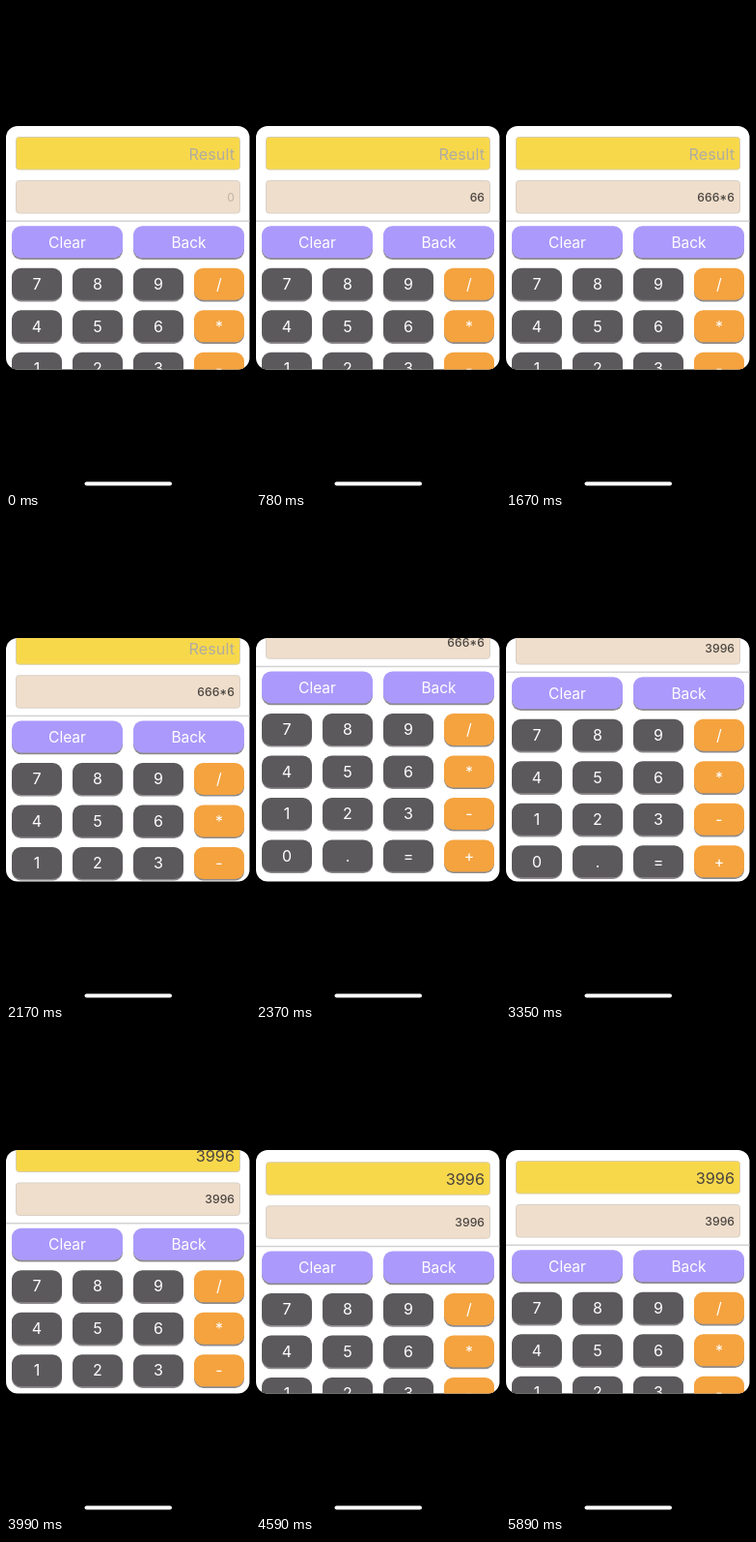
Recreate the animation shown at these times as an HTML page. Size 253x500 px, loop 5.99 s.

```html
<!DOCTYPE html>
<html lang="en">
<head>
<meta charset="utf-8">
<title>Calculator</title>
<style>
html, body { margin: 0; width: 100%; height: 100%; overflow: hidden; background: #000; }
svg { display: block; width: 100%; height: 100%; }
text { font-family: Inter, Roboto, sans-serif; }
.key { fill: #fff; font-size: 16px; text-anchor: middle; }
.wide { font-size: 15.5px; }
.value { text-anchor: end; fill: #494440; }
#result { font-size: 16.3px; }
#entry { font-size: 12.2px; font-weight: 500; }
#result.empty { fill: #b0aca0; }
#entry.empty { fill: #bfb4a8; font-weight: 400; }
</style>
</head>
<body>
<svg viewBox="0 0 253 500">
  <clipPath id="card"><rect y="124" width="252.5" height="251.5" rx="12"/></clipPath>
  <g clip-path="url(#card)">
    <rect y="124" width="253" height="252" fill="#fff"/>
    <g id="page">
      <rect x="10.5" y="135.5" width="232" height="33.5" rx="3" fill="#f8d84b" stroke="#d6cda8"/>
      <rect x="10.5" y="180.5" width="232" height="33.5" rx="3" fill="#efdecb" stroke="#d8d0c8"/>
      <text id="result" class="value" x="237" y="158.7"/>
      <text id="entry" class="value" x="237" y="201.8"/>
      <rect y="221.5" width="253" height="1.5" fill="#d2d2d4"/>
    </g>
  </g>
  <rect x="81.5" y="491.5" width="90.5" height="4" rx="2" fill="#fff"/>
</svg>
<script>
const LOOP = 5990, BOTTOM = -63;
const $ = id => document.getElementById(id);
const page = $('page'), result = $('result'), entry = $('entry');

function add(tag, attrs, label = '') {
  const el = document.createElementNS('http://www.w3.org/2000/svg', tag);
  for (const name in attrs) el.setAttribute(name, attrs[name]);
  el.textContent = label;
  page.append(el);
}

function key(label, x, y, width, fill, cls = 'key') {
  const box = { x, width, height: 33, rx: 9.5 };
  add('rect', { ...box, y: y + 1.7, fill: '#8e8b8d' });
  add('rect', { ...box, y, fill });
  add('text', { x: x + width / 2, y: y + 22.3, class: cls }, label);
}

key('Clear', 6, 227.3, 115, '#ab9afb', 'key wide');
key('Back', 132, 227.3, 115, '#ab9afb', 'key wide');
['789/', '456*', '123-', '0.=+'].forEach((row, r) =>
  [...row].forEach((label, c) =>
    key(label, 6 + 63 * c, 270.7 + 43.5 * r, 52, c < 3 ? '#5b595c' : '#f4a33f')));

// The entry line at each time
const entries = [[0, '0'], [270, '6'], [550, '66'], [870, '666'],
  [1270, '666*'], [1570, '666*6'], [3270, '3996']];

function show(el, value, empty) {
  if (el.textContent !== value) el.textContent = value;
  el.classList.toggle('empty', empty);
}

// A flick from one end to past the other, then a rubber-band settle
function flick(t, start, peakTime, from, peak, rest, decay) {
  const p = Math.min(1, Math.max(0, (t - start) / (peakTime - start)));
  if (p < 1) return from + (peak - from) * p * p * (3 - 2 * p);
  return rest + (peak - rest) * Math.exp((peakTime - t) / decay);
}

function scroll(t) {
  if (t < 2040 || t >= 5060) return 0;
  if (t >= 3150 && t < 3870) return BOTTOM;
  const step = (phase, first) => Math.max(first, Math.floor((t - phase) / 100) * 100 + phase);
  return t < 3150
    ? flick(step(70, 2040), 2040, 2460, 0, -78, BOTTOM, 187)
    : flick(step(90, 3870), 3780, 4164, BOTTOM, 8, 0, 230);
}

function draw(now) {
  const t = now % LOOP;
  const value = entries.findLast(([time]) => t >= time)[1];
  const done = t >= 3270;
  show(entry, value, value === '0');
  show(result, done ? '3996' : 'Result', !done);
  page.setAttribute('transform', `translate(0 ${scroll(t).toFixed(2)})`);
}

const begin = performance.now();
function tick() {
  draw(performance.now() - begin);
  requestAnimationFrame(tick);
}
tick();
</script>
</body>
</html>
```
